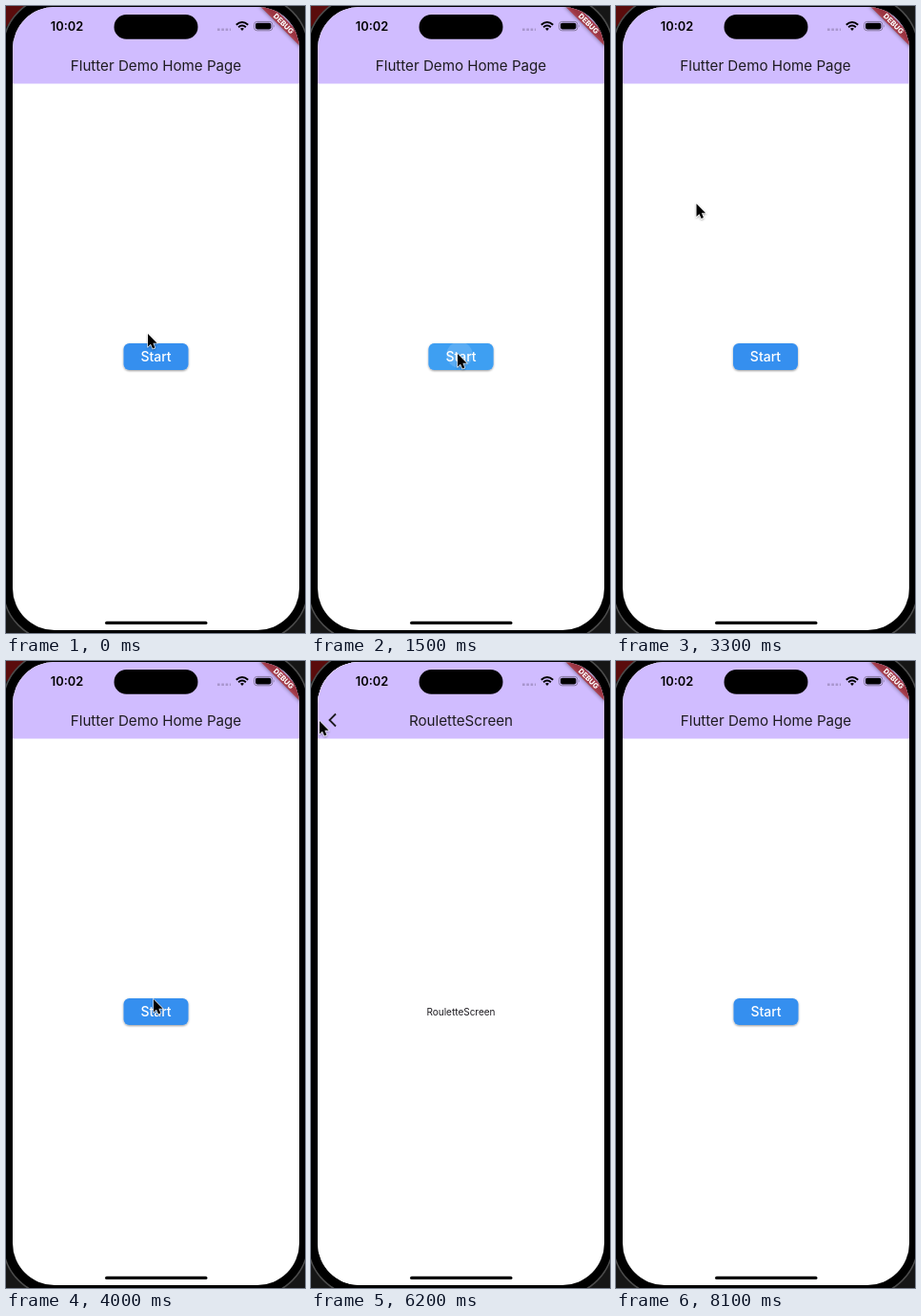
Write an HTML page that moves like this. It is 314 by 658 pixels and loops after 8.2 s.

```html
<!DOCTYPE html>
<html lang="en">
<head>
<meta charset="utf-8">
<title>Page transition demo</title>
<style>
  html, body { margin: 0; width: 100%; height: 100%; overflow: hidden; background: #161616; }
  svg { display: block; width: 314px; height: 658px; font-family: Inter, Roboto, sans-serif; }
  text { text-anchor: middle; fill: #1d1b20; }
  .title { font-size: 15.15px; }
  .debug { font-size: 7.6px; font-weight: 800; fill: #fff; }
</style>
</head>
<body>
<svg viewBox="0 0 314 658">
  <defs>
    <clipPath id="screen"><rect x="7" y="1" width="301" height="654" rx="44"/></clipPath>
    <clipPath id="buttonClip"><rect x="123.5" y="354" width="68" height="28" rx="6"/></clipPath>
    <filter id="soft" x="-50%" y="-100%" width="200%" height="300%"><feGaussianBlur stdDeviation="2"/></filter>
    <filter id="lift" x="-20%" y="-20%" width="140%" height="160%">
      <feDropShadow dx="0" dy="1" stdDeviation=".8" flood-opacity=".4"/>
    </filter>
    <g id="page">
      <rect x="7" y="1" width="301" height="654" fill="#fff"/>
      <rect x="7" y="1" width="301" height="80.5" fill="#d0bcff"/>
    </g>
  </defs>

  <path d="M0 0H20L0 22Z" fill="#5a0c0c"/>
  <rect x="-3" y="-10" width="320" height="676" rx="55" fill="#000" stroke="#4c4c4c" stroke-width="1.5"/>

  <g clip-path="url(#screen)">
    <g id="home">
      <use href="#page"/>
      <text class="title" x="157.5" y="68">Flutter Demo Home Page</text>
      <rect x="123.5" y="354" width="68" height="28" rx="6" fill="#368fef" filter="url(#lift)"/>
      <g clip-path="url(#buttonClip)" fill="#fff">
        <rect id="glow" x="123" y="354" width="69" height="28" fill="#48b0f6"/>
        <circle id="ripple"/>
      </g>
      <text x="157.5" y="373.2" font-size="14" font-weight="500" style="fill:#fff">Start</text>
    </g>
    <g id="roulette">
      <use href="#page"/>
      <text class="title" x="157.5" y="68">RouletteScreen</text>
      <path d="M26 55.5L19.5 62L26 68.5" fill="none" stroke="#1d1b20" stroke-width="1.8"/>
      <text x="157.5" y="372.3" font-size="10">RouletteScreen</text>
    </g>

    <g transform="translate(310 0) rotate(45)">
      <rect x="-31" y="21.5" width="62" height="9.2" opacity=".5" filter="url(#soft)"/>
      <rect x="-31" y="21.5" width="62" height="9.2" fill="#b71c1c" opacity=".63"/>
      <text class="debug" y="28.8">DEBUG</text>
    </g>
    <text x="64" y="26" font-size="12.8" font-weight="600" style="fill:#000">10:02</text>
    <path d="M222 24.7H236" stroke="#a795cc" stroke-width="2.6" stroke-dasharray="2.6 1.7"/>
    <g fill="none" stroke="#000" stroke-width="2">
      <path d="M241.8 19.8Q248 14.2 254.2 19.8M244.1 22.2Q248 18.8 251.9 22.2"/>
      <path d="M246 23.8Q248 22.2 250 23.8L248 25.9Z" fill="#000" stroke="none"/>
    </g>
    <rect x="260.6" y="16.4" width="19.2" height="9.4" rx="3" fill="none" stroke="#85789f"/>
    <rect x="262" y="17.8" width="16.4" height="6.6" rx="1.8"/>
    <path d="M281 19.5Q282.6 21 281 22.7Z" fill="#85789f"/>
    <rect x="104" y="645.7" width="107.5" height="3.4" rx="1.7"/>
  </g>
  <rect x="113.5" y="9" width="88" height="25.8" rx="12.9"/>

  <path id="cursor" d="M0 0V13.5L3 10.8L5.1 15.6L7.4 14.6L5.4 9.8H9.6Z"
        stroke="#fff" stroke-width="1.1" paint-order="stroke" filter="url(#lift)"/>
</svg>
<script>
const LOOP = 8200, STEP = 100, SLIDE = 500, WIDTH = 301;
const visits = [
  { press: 1390, push: 1520, pop: 2850, x: 156, y: 366 },
  { press: 5290, push: 5420, pop: 6430, x: 160, y: 374 }
];
// time, x, y of the pointer tip
const trail = [
  [0, 149, 344], [1200, 154, 365], [1600, 154, 365], [2300, 37, 137],
  [2700, 19, 63], [3000, 19, 63], [3600, 150, 352], [3700, 150, 352],
  [4000, 155, 355], [4100, 155, 355], [4400, 157, 366], [4600, 157, 366],
  [5000, 166, 396], [5300, 160, 374], [5500, 160, 374], [6200, 9, 63],
  [6400, 18, 63], [6800, 20, 63], [7000, 76, 63], [7100, 162, 400], [7200, 150, 627]
];
const [home, roulette, glow, ripple, cursor] =
  ["home", "roulette", "glow", "ripple", "cursor"].map(id => document.getElementById(id));

const clamp = v => Math.min(1, Math.max(0, v));
const place = (el, x, y = 0) => el.setAttribute("transform", `translate(${x} ${y})`);

function bezier(x1, y1, x2, y2) {
  const at = (a, b, s) => 3 * a * s * (1 - s) ** 2 + 3 * b * s * s * (1 - s) + s ** 3;
  return x => {
    let lo = 0, hi = 1;
    for (let i = 0; i < 24; i++) {
      const mid = (lo + hi) / 2;
      at(x1, x2, mid) < x ? lo = mid : hi = mid;
    }
    return at(y1, y2, lo);
  };
}
const parallax = bezier(.35, .91, .33, .97);
const MX = .198, MY = .541;
const early = bezier(.056 / MX, .024 / MY, .108 / MX, .3085 / MY);
const late = bezier((.3655 - MX) / (1 - MX), 1, (.5465 - MX) / (1 - MX), (.989 - MY) / (1 - MY));
const slide = p => p < MX ? MY * early(p / MX) : MY + (1 - MY) * late((p - MX) / (1 - MX));

function pointer(t) {
  const i = trail.findIndex(k => k[0] > t);
  if (i < 0) return trail.at(-1).slice(1);
  const [t0, x0, y0] = trail[i - 1], [t1, x1, y1] = trail[i];
  const p = (t - t0) / (t1 - t0), e = p * p * (3 - 2 * p);
  return [x0 + (x1 - x0) * e, y0 + (y1 - y0) * e];
}

function draw(t) {
  const visit = visits[t < 4500 ? 0 : 1];
  const pushed = clamp((t - visit.push) / SLIDE), popped = clamp((t - visit.pop) / SLIDE);
  place(roulette, WIDTH * (1 - slide(pushed) + slide(popped)));
  place(home, -WIDTH / 3 * (parallax(pushed) - parallax(popped)));

  const age = t - visit.press;
  const fade = age < 0 ? 0 : 1 - clamp((age - 130) / 250);
  glow.setAttribute("opacity", .5 * fade);
  ripple.setAttribute("opacity", .15 * fade);
  ripple.setAttribute("r", 10 + Math.max(0, age) * .033);
  ripple.setAttribute("cx", visit.x);
  ripple.setAttribute("cy", visit.y);

  place(cursor, ...pointer(t));
  cursor.style.display = t < 7400 ? "" : "none";
}

const start = performance.now();
function tick() {
  const t = (performance.now() - start) % LOOP;
  draw(Math.floor(t / STEP) * STEP);
  requestAnimationFrame(tick);
}
tick();
</script>
</body>
</html>
```
